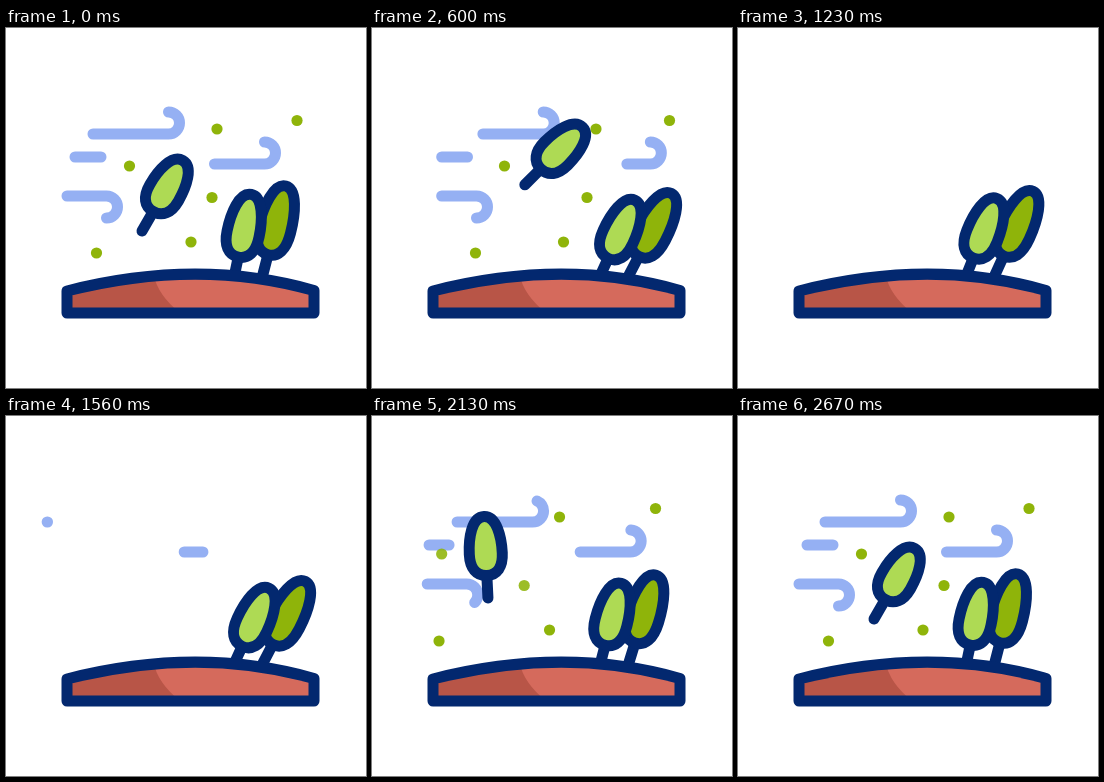
Write an HTML page that moves like this. It is 360 px wide and 360 px high and loops after 2700 ms.

```html
<!DOCTYPE html>
<html lang="en">
<head>
<meta charset="utf-8">
<title>Windy hill</title>
<style>
  html, body { margin: 0; width: 100%; height: 100%; overflow: hidden; background: #fff; }
  svg { display: block; width: 100vw; height: 100vh; }
  .ink { stroke: #03286f; stroke-width: 11; stroke-linecap: round; stroke-linejoin: round; }
  .wind { fill: none; stroke: #95b0f3; stroke-width: 11; stroke-linecap: round; }
</style>
</head>
<body>
<svg id="stage" viewBox="0 0 360 360"></svg>
<script>
const LOOP = 2700, STEP = 30;
const LIME = '#aeda54', GREEN = '#8fb40a';
const HILL = 'M61 263Q192 229.500 308 262.5V285H61Z';
const stage = document.getElementById('stage');

function add(tag, attrs, parent = stage) {
  const el = document.createElementNS('http://www.w3.org/2000/svg', tag);
  for (const k in attrs) el.setAttribute(k, attrs[k]);
  return parent.appendChild(el);
}

const clamp = v => Math.min(1, Math.max(0, v));
const smooth = u => u * u * (3 - 2 * u);
const show = (el, on) => el.setAttribute('visibility', on ? 'visible' : 'hidden');

// Egg outline of half width a and half height b, centred on (0, y)
function egg(y, a, b) {
  const m = y + b * 0.26, k = a * 0.76;
  return `M0 ${y - b}C${k} ${y - b} ${a} ${y - b * 0.28} ${a} ${m}` +
    `C${a} ${y + b * 0.74} ${a * 0.62} ${y + b} 0 ${y + b}` +
    `C${-a * 0.62} ${y + b} ${-a} ${y + b * 0.74} ${-a} ${m}` +
    `C${-a} ${y - b * 0.28} ${-k} ${y - b} 0 ${y - b}Z`;
}

function leafShape(y, a, b, stem, fill) {
  const g = add('g', { class: 'ink' });
  add('path', { d: `M0 ${y + b}V${stem}` }, g);
  add('path', { d: egg(y, a, b), fill }, g);
  return g;
}

// Wind strokes: path, exit start, entry start, entry time, entry offset
const winds = [
  ['M87 106H162.500a11 11 0 0 0 0-22', 220, 1559, 874, 46],
  ['M69 129H95', 455, 1820, 800, 52],
  ['M208.500 136H258.500a11 11 0 0 0 0-22', 100, 1496, 796, 39],
  ['M61 168H100.500a11 11 0 0 1 0 22', 307, 1745, 760, 48]
].map(([d, out, back, time, dist]) =>
  ({ el: add('path', { d, class: 'wind', pathLength: 1 }), out, back, time, dist }));

function drawWind({ el, out, back, time, dist }, t) {
  let from = 0, to = 1, x;
  if (t < back) {
    from = clamp((t - out) / 735) ** 3;
    x = 63 * from;
  } else {
    to = 1 - (1 - clamp((t - back) / time)) ** 3;
    x = -dist * (1 - to);
  }
  show(el, to - from > 0.002);
  el.setAttribute('transform', `translate(${x})`);
  el.setAttribute('stroke-dasharray', from === 0 && to === 1 ? 'none' : `${to - from} 2`);
  el.setAttribute('stroke-dashoffset', -from);
}

// Trees: root x, root y, resting tilt
const trees = [
  { el: leafShape(-57.5, 16.4, 35.5, 0, GREEN), x: 256.5, y: 248, tilt: 14.5 },
  { el: leafShape(-50.3, 16.3, 32, 0, LIME), x: 228.5, y: 247, tilt: 11.8 }
];
const bends = [[0, 0], [600, 12.9], [1080, 9], [1560, 12.9], [2370, 0], [LOOP, 0]];

function bendAt(t) {
  const i = bends.findIndex(b => t < b[0]);
  const [t0, a] = bends[i - 1], [t1, b] = bends[i];
  return a + (b - a) * smooth((t - t0) / (t1 - t0));
}

add('path', { fill: '#d56a5c', d: HILL });
add('path', { fill: '#b85547', d: 'M61 263Q105 252 148 248Q152 267 174 285H61Z' });
add('path', { class: 'ink', fill: 'none', d: HILL });

// Seeds: x, y, exit start, exit rate, entry start, entry time
const seeds = [
  [291, 92.5, 256, 0.00742, 1778, 703],
  [211, 101, 260, 0.0106, 1941, 703],
  [123.5, 138, 295, 0.00983, 2109, 590],
  [206, 169.5, 295, 0.00983, 2109, 590],
  [185, 214, 256, 0.00742, 1778, 703],
  [90.5, 225, 260, 0.0106, 1941, 703]
].map(([cx, cy, out, rate, back, time]) =>
  ({ el: add('circle', { cx, cy, r: 5.6, fill: GREEN }), out, rate, back, time }));

function drawSeed({ el, out, rate, back, time }, t) {
  let x, alpha;
  if (t < back) {
    x = (Math.max(0, t - out) * rate) ** 2;
    alpha = clamp((44 - x) / 13);
  } else {
    x = -60 * (1 - clamp((t - back) / time)) ** 3;
    alpha = clamp((x + 60) / 7);
  }
  el.setAttribute('transform', `translate(${x})`);
  el.setAttribute('opacity', alpha);
}

const leaf = leafShape(0, 16.5, 29.5, 52, LIME);

function drawLeaf(t) {
  let x, y, turn;
  if (t < 1400) {
    const p = (Math.max(0, t - 215) / 715) ** 3;
    x = 162 + 177 * p;
    y = 158 - 59.5 * (1 - Math.max(0, 1 - p) ** 6);
    turn = 30 + 99.9 * p - 23.9 * p * p;
  } else {
    const r = clamp((2625 - t) / 850) ** 3;
    x = 162 - 246 * r;
    y = 158 - 177.7 * r + 181.9 * r * r;
    turn = 30 - 166 * r;
  }
  show(leaf, t < 1080 || t > 1770);
  leaf.setAttribute('transform', `translate(${x} ${y}) rotate(${turn})`);
}

function draw(t) {
  winds.forEach(w => drawWind(w, t));
  seeds.forEach(s => drawSeed(s, t));
  const bend = bendAt(t);
  for (const { el, x, y, tilt } of trees)
    el.setAttribute('transform', `translate(${x} ${y}) rotate(${tilt + bend})`);
  drawLeaf(t);
}

const start = performance.now();
function tick() {
  const t = (performance.now() - start) % LOOP;
  draw(Math.floor(t / STEP) * STEP);
  requestAnimationFrame(tick);
}
tick();
</script>
</body>
</html>
```
